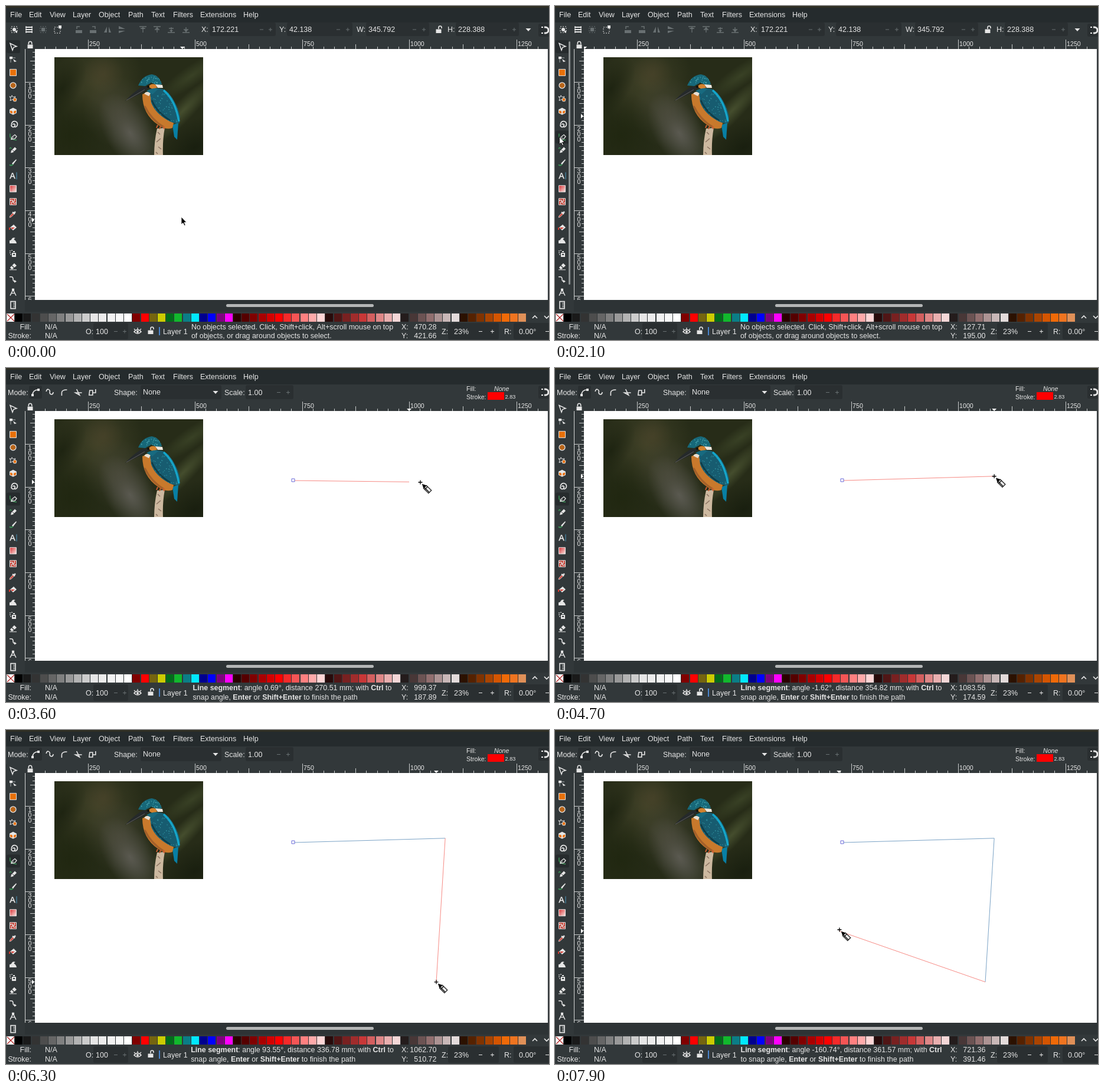
Recreate the animation shown at these times as an HTML page with a canvas. Size 920x567 px, loop 8 s.

```html
<!DOCTYPE html>
<html lang="en">
<head>
<meta charset="utf-8">
<title>Drawing a path</title>
<style>
html, body { margin: 0; width: 100%; height: 100%; overflow: hidden; background: #32383a; }
canvas { display: block; }
</style>
</head>
<body>
<canvas id="stage" width="920" height="567"></canvas>
<script>
const ctx = document.getElementById('stage').getContext('2d');
const LOOP = 8000, STEP = 100, LEAD = 40;
const TOOL_SWITCH = 2300;
const SCALE = 0.726, LEFT = -42.5, TOP = 57;
const BAR = '#32383a', MENU = '#252b2d', DARK = '#2a2f31', LIGHT = '#e6e6e6', DIM = '#697072', ORANGE = '#e8710a';
const SANS = '"Liberation Sans", Arial, sans-serif';
const px = x => LEFT + x * SCALE;
const py = y => TOP + y * SCALE;

// Pointer path: time, then document coordinates in mm.
const TRACK = [
  [0, 470.28, 421.66], [40, 467.6, 414.6], [350, 330, 315], [700, 127.71, 195],
  [850, 88, 184], [1100, 86, 187], [1500, 78, 210], [1800, 68.5, 227], [2600, 69, 227],
  [2800, 141, 204], [3050, 728.88, 184.64], [3200, 728.88, 184.64],
  [3600, 999.37, 187.89], [3640, 1025.5, 188.7], [3900, 1062, 184], [4300, 1083.56, 174.59],
  [4400, 1083.56, 174.59], [4550, 1087, 173], [4700, 1083.56, 174.59], [4800, 1083.56, 174.59],
  [4950, 1090, 190], [5200, 1113, 270], [5450, 1112, 385], [5700, 1080, 478],
  [6200, 1062.7, 510.72], [6440, 1062.7, 510.72], [6700, 1010, 508], [7000, 905, 480],
  [7400, 785, 430], [7900, 721.36, 391.46], [7940, 722.4, 388.4], [8000, 723, 385]
];
const CLICKS = [3200, 4800, 6400];

function track(t) {
  let i = 1;
  while (i < TRACK.length - 1 && TRACK[i][0] < t) i++;
  const a = TRACK[i - 1], b = TRACK[i];
  const k = Math.min(1, Math.max(0, (t - a[0]) / (b[0] - a[0])));
  return { x: a[1] + (b[1] - a[1]) * k, y: a[2] + (b[2] - a[2]) * k };
}

function rect(x, y, w, h, color) {
  ctx.fillStyle = color;
  ctx.fillRect(x, y, w, h);
}

function text(s, x, y, { size = 12.5, color = LIGHT, style = '', align = 'left' } = {}) {
  ctx.font = `${style} ${size}px ${SANS}`;
  ctx.fillStyle = color;
  ctx.textAlign = align;
  ctx.fillText(s, x, y);
}

function shape(x, y, d, fill, stroke, width = 1) {
  const p = new Path2D(d);
  ctx.save();
  ctx.translate(x, y);
  if (fill) { ctx.fillStyle = fill; ctx.fill(p); }
  if (stroke) { ctx.strokeStyle = stroke; ctx.lineWidth = width; ctx.stroke(p); }
  ctx.restore();
}

function line(points, color) {
  ctx.beginPath();
  points.forEach(p => ctx.lineTo(px(p.x), py(p.y)));
  ctx.strokeStyle = color;
  ctx.lineWidth = 1;
  ctx.stroke();
}

function roundBox(x, y, w, h, r, color) {
  ctx.beginPath();
  ctx.roundRect(x, y, w, h, r);
  ctx.fillStyle = color;
  ctx.fill();
}

const MINUS = 'M-3 0H3', PLUS = 'M-3 0H3M0-3V3', DOWN = 'M-4.5-2H4.5L0 3Z';

function spin(x, y, w, h, value, minusX, plusX, color = DIM) {
  roundBox(x, y, w, h, 3, DARK);
  text(value, x + 4, y + h / 2 + 4.5);
  shape(minusX, y + h / 2 + .5, MINUS, null, color);
  shape(plusX, y + h / 2 + .5, PLUS, null, color);
}

function lock(x, y, open) {
  shape(x, y, 'M-4.5-.5H4.5V6H-4.5Z', LIGHT);
  shape(x, y, open ? 'M0-1V-3.5A2.5 2.5 0 0 1 5-3.5V-2' : 'M-2.7-1V-3A2.7 2.7 0 0 1 2.7-3V-1', null, LIGHT, 1.6);
}

// Each tool is a stack of [path, fill, stroke, width] around its centre.
const RING = 'M-5 0a5 5 0 1 0 10 0a5 5 0 1 0-10 0', SQUARE = 'M-5.5-5.5H5.5V5.5H-5.5Z';
const TOOLS = [
  [['M-5-5.5L6-.5 1 1-1 6Z', DARK, LIGHT, 1.5]],
  [['M-6-5h5v4h-5z', LIGHT], ['M-1-3H4M-4-1V5', null, '#a9adae'], ['M0-1L6 3 2 4Z', LIGHT]],
  [[SQUARE, ORANGE, LIGHT]],
  [[RING, '#b8651a', LIGHT, 1.3]],
  [['M-2-5L0-2 4-3 2 0 3 4-1 2-5 4-4 0-6-3-3-2Z', null, LIGHT], ['M3-1l3 2-1 4h-4l-1-4z', ORANGE, LIGHT]],
  [['M0-6L6-3V3L0 6-6 3V-3Z', LIGHT], ['M-5-1.5L-1 0V4L-5 2.5ZM1 0L5-1.5V2.5L1 4Z', ORANGE]],
  [['M0 1a1.4 1.4 0 0 1 2.5-1a3 3 0 1 1-5 .5a5 5 0 1 1 5 4.5', null, LIGHT, 1.7]],
  [['M-5-6Q-7 5 6 5', null, '#3c9a58', 1.4], ['M-3 4L-2 0 3-4 6-1 3 3Z', null, LIGHT, 1.3], ['M-3 4L1 0', null, LIGHT]],
  [['M-6-2Q-4-6-3-2', null, '#3c9a58', 1.3], ['M-4 5L-3 1 3-5 6-2 0 4Z', LIGHT], ['M-1 0L2 3', null, DARK]],
  [['M-6 3Q-3 6 0 2', null, '#3c9a58', 1.8], ['M-2 1L5-6 6-5 0 3Z', LIGHT]],
  [['M-6 5L-2-5H0L4 5H2L1 2H-3L-4 5ZM-2.5 .3H.5L-1-3.5Z', LIGHT], ['M6-6V6', null, '#4a9ac0']],
  [[SQUARE, 'gradient', LIGHT]],
  [[SQUARE, '#c23b2f', LIGHT], ['M-5-2Q0-4 0 0T5 2M-2 5Q-4 0 0 0T2-5', null, LIGHT, 1.3]],
  [['M-6 5L-5 2 0-3 2-1-3 4Z', '#d54b40', LIGHT, .7], ['M-1-4L3-1M1-2L4-5', null, LIGHT, 2.5]],
  [['M-5 0L1-5 6 0 0 5Z', LIGHT], ['M-4 0h7l-4 3z', '#d33a30'], ['M-6 0V4', null, '#d33a30', 2]],
  [['M-6 5V0Q-3 0-2-3 0-6 4-4 1-3 2-1 5 0 6 5Z', LIGHT]],
  [['M-2-1H5V6H-2ZM0-4H3V-2H0Z', LIGHT], ['M-6-4h2M-6-1h2M-3-5h2M-5 2h2', null, LIGHT, 1.4], ['M0 2H3', null, DARK, 2]],
  [['M-5 2L2-5 6-1-1 5H-3Z', LIGHT], ['M-2-1L2 3', null, DARK, 1.3], ['M-6 6H6', null, LIGHT]],
  [['M-6-4H-3Q0-4 0 0T4 4', null, LIGHT, 1.6], ['M2 1L6 4 2 6Z', LIGHT]],
  [['M-5 6L0-4 5 6M-3 2H3', null, LIGHT, 1.4], ['M-2-6H2V-2H-2Z', LIGHT]],
  [['M-4-6H4V6H-4Z', null, LIGHT, 1.6], ['M0-3H4M0 0H4M0 3H4', null, LIGHT]]
];
const toolY = i => 69 + i * 21.93;

function tools(selected, hover) {
  rect(0, 58, 1, 460, '#22282a');
  [selected, hover].forEach(i => {
    if (i >= 0) roundBox(1, toolY(i) - 11, 23, 22, 3, '#262b2d');
  });
  const red = ctx.createLinearGradient(-5, -5, 5, 5);
  red.addColorStop(0, '#d8373a');
  red.addColorStop(1, '#f6dfdc');
  TOOLS.forEach((layers, i) => layers.forEach(([d, fill, stroke, w]) =>
    shape(12, toolY(i), d, fill === 'gradient' ? red : fill, stroke, w)));
}

function menu() {
  rect(0, 0, 920, 28, MENU);
  rect(0, 0, 920, 3, '#2f2f24');
  const items = { File: 7, Edit: 39, View: 74, Layer: 113, Object: 157, Path: 207, Text: 246, Filters: 283, Extensions: 329, Help: 402 };
  for (const name in items) text(name, items[name], 19.3);
}

function magnet() {
  roundBox(902, 30, 26, 22, 3, DARK);
  shape(913, 41, 'M-1-5H1A5 5 0 0 1 1 5H-1', null, LIGHT, 3);
  shape(913, 41, 'M-6-5h3M-6 5h3', null, LIGHT, 2);
}

function selectBar() {
  const dashed = 'M-5-5h2M-1-5h2M3-5h2M-5 5h2M-1 5h2M3 5h2M-5-3v2M-5 1v2M5-3v2M5 1v2';
  const bars = 'M-6-4H6M-6 0H6M-6 4H6';
  shape(14, 40, dashed, null, LIGHT);
  shape(14, 40, 'M-3 0a3 3 0 1 0 6 0a3 3 0 1 0-6 0M2 2H5V5H2Z', LIGHT);
  shape(39, 40, bars, null, LIGHT, 2);
  shape(39, 40, 'M-5-6V6M5-6V6', null, LIGHT);
  shape(63, 40, dashed, null, DIM);
  shape(63, 40, 'M-3-3H3V3H-3Z', DIM);
  shape(87, 41, dashed, null, LIGHT);
  shape(92, 36, 'M-3-3H2V2H-3Z', LIGHT);
  [[123, -1], [148, 1]].forEach(([x, s]) => {
    shape(x, 40, `M${-s * 6} 1H${s * 5}V6H${-s * 6}Z`, DIM);
    shape(x, 40, `M${s * 3}-1V-5H${-s * 2}`, null, DIM, 1.5);
  });
  shape(172, 40, 'M-1-5V5H-6ZM2-5V5H6Z', DIM);
  shape(196, 40, 'M-5-1H6L-5-6ZM-5 2H6L-5 6Z', DIM);
  [232, 256, 280, 305].forEach((x, i) => {
    const edge = i < 2 ? -5 : 5;
    shape(x, 40, `M-6 ${edge}H6M0-4V5M-4 ${i % 2 ? 0 : -2}H4`, null, DIM, 1.3);
    shape(x, 40, i < 2 ? 'M-3-1L0-4 3-1Z' : 'M-3 1L0 4 3 1Z', DIM);
  });
  const fields = [
    ['X:', 331, '172.221', 345, 112, 433, 448], ['Y:', 463, '42.138', 476, 111, 563, 579],
    ['W:', 594, '345.792', 610, 107, 692, 708], ['H:', 748, '228.388', 762, 107, 845, 861]
  ];
  fields.forEach(([label, lx, value, x, w, m, p]) => {
    text(label, lx, 44.3);
    spin(x, 28, w, 23, value, m, p);
  });
  lock(733, 40, true);
  shape(885, 40, DOWN, LIGHT);
  magnet();
}

function penBar() {
  text('Mode:', 3, 45.8);
  roundBox(39, 30, 22, 22, 3, DARK);
  const modes = ['M-5 5C-5-2 0-4 5-4', 'M-6-1C-5-8 1-4 0 0S5 6 6 0', 'M-4 6V1Q-4-4 5-4', 'M-3-5L2 5-5 1 6 1', 'M-5-3H0V5H-6ZM0 1H5V-5'];
  modes.forEach((d, i) => shape(50 + i * 24.2, 41, d, null, LIGHT, 1.6));
  shape(50, 41, 'M-7 3h4v4h-4zM3-6h4v4h-4z', LIGHT);
  text('Shape:', 183, 45.8);
  roundBox(228, 29, 137, 24, 3, DARK);
  text('None', 232, 45.3);
  shape(355, 41, DOWN, LIGHT);
  text('Scale:', 370, 45.8);
  spin(406, 29, 81, 24, '1.00', 462, 478);
  text('Fill:', 780, 39, { size: 10.6 });
  text('None', 827, 39, { size: 10.6, style: 'italic' });
  text('Stroke:', 780, 52.5, { size: 10.6 });
  rect(816, 41, 28, 13, '#f00');
  text('2.83', 845.5, 52, { size: 9.2 });
  magnet();
}

function rulers(mark, bottom) {
  lock(41, 66, false);
  ctx.save();
  ctx.beginPath();
  ctx.rect(49, 56, 869, 17);
  ctx.rect(32, 73, 17, bottom - 73);
  ctx.clip();
  const size = i => i % 10 === 0 ? 16 : i % 5 === 0 ? 8 : 4;
  for (let i = 4; i < 54; i++) {
    const x = Math.floor(px(i * 25));
    rect(x, 73 - size(i), 1, size(i), '#c9cccc');
    if (i % 10 === 0) text(String(i * 25), x + 2, 68, { size: 10.7 });
  }
  for (let i = 2; i < 62; i++) {
    const y = Math.floor(py(i * 10));
    rect(49 - size(i), y, size(i), 1, '#c9cccc');
    if (i % 10 === 0) [...String(i * 10)].forEach((c, n) => text(c, 37.5, y + 10 + n * 8.8, { size: 10.7 }));
  }
  shape(mark.x, 73, 'M-4-4H4L0 0Z', '#fff');
  shape(48, mark.y, 'M-4-4V4L0 0Z', '#fff');
  ctx.restore();
  rect(32, 73, 1, bottom - 73, '#d5d7d7');
}

function glow(x, y, r, color, sx = 1, sy = 1, angle = 0) {
  ctx.save();
  ctx.translate(x, y);
  ctx.rotate(angle);
  ctx.scale(sx, sy);
  const g = ctx.createRadialGradient(0, 0, 0, 0, 0, r);
  g.addColorStop(0, color);
  g.addColorStop(1, color.slice(0, 7) + '00');
  ctx.fillStyle = g;
  ctx.fillRect(-r, -r, r * 2, r * 2);
  ctx.restore();
}

function speckle(d, count, x, y, w, h, color) {
  let seed = 7;
  const rand = () => (seed = seed * 16807 % 2147483647) / 2147483647;
  ctx.save();
  ctx.clip(new Path2D(d));
  for (let i = 0; i < count; i++) rect(x + rand() * w, y + rand() * h, 1.2, 1.2, color);
  ctx.restore();
}

function photo() {
  ctx.save();
  ctx.beginPath();
  ctx.rect(82, 87, 252, 166);
  ctx.clip();
  rect(82, 87, 252, 167, '#272c18');
  glow(155, 130, 85, '#434429dd', .9, 1, .4);
  glow(165, 115, 35, '#4e452c88');
  glow(210, 215, 75, '#65635de0', 1, .55, 1);
  glow(190, 180, 60, '#4d4c3d99');
  glow(300, 178, 80, '#47502fee', 1, .22, -.8);
  glow(315, 118, 70, '#3d4628cc', 1, .25, -.6);
  glow(95, 140, 60, '#1b210fcc', 1, .5, -1);
  glow(110, 220, 75, '#1f260fcc');
  glow(320, 240, 65, '#171d0edd', 1.2, .7, -.5);
  const draw = (d, fill, stroke, w) => shape(0, 0, d, fill, stroke, w);
  draw('M256 208L269 207Q265 228 266 254H251Q251 230 256 208Z', '#cdb9a0');
  draw('M257 214L261 218M262 225L255 231M258 239L263 243M254 248L257 251', null, '#8c7462', 1.6);
  draw('M282 202L292 198 290 227 285 222Z', '#087fa4');
  draw('M231 150Q238 145 250 149L284 199 282 207Q270 211 258 202 231 184 231 150Z', '#c8792c');
  draw('M235 170Q246 193 268 206', null, '#a3602a', 3);
  const wing = 'M244 148C252 139 262 138 270 143 282 152 292 172 295 188L294 199Q283 200 274 194 253 182 246 164Z';
  draw(wing, '#175c70');
  draw('M267 143Q287 160 293 196', null, '#13a6cb', 3.5);
  draw('M247 160Q256 181 278 194', null, '#0e3c48', 2.5);
  speckle(wing, 100, 242, 138, 52, 64, '#3597a5');
  const crest = 'M224 135Q231 118 247 116 260 118 264 133L255 134 246 130 236 136Z';
  draw(crest, '#176879');
  speckle(crest, 60, 224, 116, 42, 26, '#55b0b8');
  draw('M241 137Q247 130 254 134L256 139 248 141Z', '#d3822e');
  draw('M253 133L265 134 266 139 257 139Z', '#eee7dd');
  draw('M234 149Q238 143 245 148L242 153Z', '#eadfd1');
  draw('M238 144Q249 138 259 140L248 150Z', '#176a80');
  draw('M202 161Q220 142 234 136L242 139 232 147Z', '#25292b');
  draw('M204 160L235 142', null, '#6c6a65', .8);
  draw('M239 137a2 2 0 1 0 4 0a2 2 0 1 0-4 0', '#111');
  draw('M257 202L255 207M262 204L260 209M267 204L268 209', null, '#d15e32', 2);
  ctx.restore();
}

const REDS = '2b0000 550000 800000 aa0000 d40000 ff0000 f52a2a f55555 ff8080 ffaaaa ffd5d5';
const PALETTE = ('fff 000 1a1a1a 333 4d4d4d 666 808080 999 b3b3b3 ccc e6e6e6 ececec f2f2f2 f9f9f9 fff ' +
  '800000 f00 75650f cccc00 006d1a 12b82d 0b7d86 00e8ff 000090 00f 800080 f0f ' + REDS +
  ' 280b0b 501616 782121 a02c2c c83737 d35f5f de8787 e9afaf f4d7d7 241c1c 483737 6c5353 916f6f ac9393 c8b7b7 e3dbdb ' +
  '2b1100 552200 803300 aa4400 d45500 ef6a08 ef7420 e09058').split(' ');

function palette(y) {
  PALETTE.forEach((c, i) => rect(Math.round(1 + i * 14.22), y, 13, 14, '#' + c));
  shape(8, y + 7, 'M-6-6L6 6M6-6L-6 6', null, '#b02020', 1.2);
  shape(896, y + 5, 'M-4 3L0-1 4 3', null, LIGHT, 1.7);
  shape(916, y + 5, 'M-4-1L0 3 4-1', null, LIGHT, 1.7);
}

// Asterisks toggle bold.
function rich(s, x, y, visible = true) {
  s.split('*').forEach((part, i) => {
    ctx.font = `${i % 2 ? 'bold' : ''} 12.45px ${SANS}`;
    ctx.textAlign = 'left';
    ctx.fillStyle = LIGHT;
    if (visible) ctx.fillText(part, x, y);
    x += ctx.measureText(part).width;
  });
  return x;
}

function message(t, from, to) {
  if (t < TOOL_SWITCH) return ['No objects selected. Click, Shift+click, Alt+scroll mouse on top', 'of objects, or drag around objects to select.'];
  const dx = from ? to.x - from.x : 0, dy = from ? to.y - from.y : 0, dist = Math.hypot(dx, dy);
  if (!dist && t <= CLICKS[0]) return ['*Click* or *click and drag* to start a path; with *Shift* to append to', 'selected path. *Ctrl+click* to create single dots (straight line m…'];
  const angle = Math.atan2(dy, dx) * 180 / Math.PI;
  const head = `*Line segment*: angle ${angle.toFixed(2)}°, distance ${dist.toFixed(2)} mm; with *Ctrl*`;
  const tail = 'snap angle, *Enter* or *Shift+Enter* to finish the path';
  return rich(head + ' to', 0, 0, false) > 349 ? [head, 'to ' + tail] : [head + ' to', tail];
}

function status(lines, doc, shift) {
  const y1 = 549 - shift, y2 = 563.5 - shift / 4, mid = 552 - shift / 2;
  text('Fill:', 43, y1, { align: 'right' });
  text('N/A', 66, y1);
  text('Stroke:', 43, y2, { align: 'right' });
  text('N/A', 66, y2);
  text('O:', 135, mid + 4.5);
  spin(148, mid - 14, 59, 28, '100', 186, 201);
  shape(223, mid, 'M-6 1Q0-6 6 1 0 7-6 1Z', null, LIGHT, 1.6);
  shape(223, mid + 1, 'M-2 0a2 2 0 1 0 4 0a2 2 0 1 0-4 0', LIGHT);
  shape(223, mid, 'M0-3V-6M-4-2L-6-4M4-2L6-4', null, LIGHT, 1.3);
  lock(245, mid - 1, true);
  rect(259, mid - 7, 2, 14, '#4a86cf');
  text('Layer 1', 266, mid + 4.5);
  const x = 485 - rich(lines[0], 0, 0, false) / 2;
  rich(lines[0], x, y1);
  rich(lines[1], x, y2);
  text('X:', 670, y1);
  text('Y:', 670, y2);
  text(doc.x.toFixed(2), 729.5, y1, { align: 'right' });
  text(doc.y.toFixed(2), 729.5, y2, { align: 'right' });
  text('Z:', 738, mid + 4.5);
  spin(749, mid - 14, 86, 28, '', 804, 824, LIGHT);
  text('23%', 759, mid + 4.5);
  text('R:', 844, mid + 4.5);
  roundBox(860, mid - 14, 64, 28, 3, DARK);
  text('0.00°', 869, mid + 4.5);
  shape(917, mid + .5, MINUS, null, LIGHT);
}

function pointer(x, y, pen, outside) {
  if (!pen) {
    shape(x, y, 'M0 0V13L3 10.3 5.2 15 7.2 14 5 9.5H9Z', outside ? '#fff' : '#000', outside ? '#000' : '#fff', .9);
    return;
  }
  shape(x, y, 'M-3.5 0H3.5M0-3.5V3.5', null, '#000', 1.3);
  ctx.save();
  ctx.translate(x, y);
  ctx.rotate(Math.PI / 4);
  shape(0, 0, 'M4 0L11-3.5V3.5Z', '#000');
  shape(0, 0, 'M11-3.5H23V3.5H11Z', '#eee', '#111', 1.2);
  shape(0, 0, 'M11 1.5H23M14-3V3', null, '#222', 1.6);
  ctx.restore();
}

function draw(t) {
  const pen = t >= TOOL_SWITCH, shift = pen ? 2 : 0, bottom = 499 - shift;
  const tip = track(t + LEAD), tipX = px(tip.x), tipY = py(tip.y);
  const outside = tipX < 50;
  const doc = outside ? { x: 127.71, y: 195 } : track(t);
  const mark = { x: px(doc.x), y: outside ? 187 : py(doc.y) };

  rect(0, 0, 920, 567, BAR);
  menu();
  pen ? penBar() : selectBar();
  const hover = tipX < 25 ? Math.round((tipY - 69) / 21.93) : -1;
  tools(pen ? 7 : 0, hover);
  if (t >= 1000 && t < 2900) roundBox(23, 60, 3, 413, 1.5, '#8b9091');
  rulers(mark, bottom);
  rect(49, 73, 869, bottom - 73, '#fff');
  rect(32, bottom, 888, 20, '#2d3335');
  roundBox(373, 506 - shift, 250, 5, 2.5, '#b4b6b6');
  palette(522 - shift);
  photo();

  const nodes = CLICKS.filter(c => t >= c).map(track);
  const last = nodes[nodes.length - 1];
  if (last) {
    line(nodes, '#7ba3c6');
    line([last, doc], '#f78b85');
    const start = nodes[0];
    shape(Math.round(px(start.x)) - .5, Math.round(py(start.y)) - .5, 'M-2.5-2.5H2.5V2.5H-2.5Z', '#fff', '#6a6ad8');
  }
  status(message(t, last, doc), doc, shift);
  pointer(tipX, tipY, pen && !outside, outside);
}

function frame(now) {
  draw(Math.floor((now % LOOP) / STEP) * STEP);
  requestAnimationFrame(frame);
}
requestAnimationFrame(frame);
</script>
</body>
</html>
```
